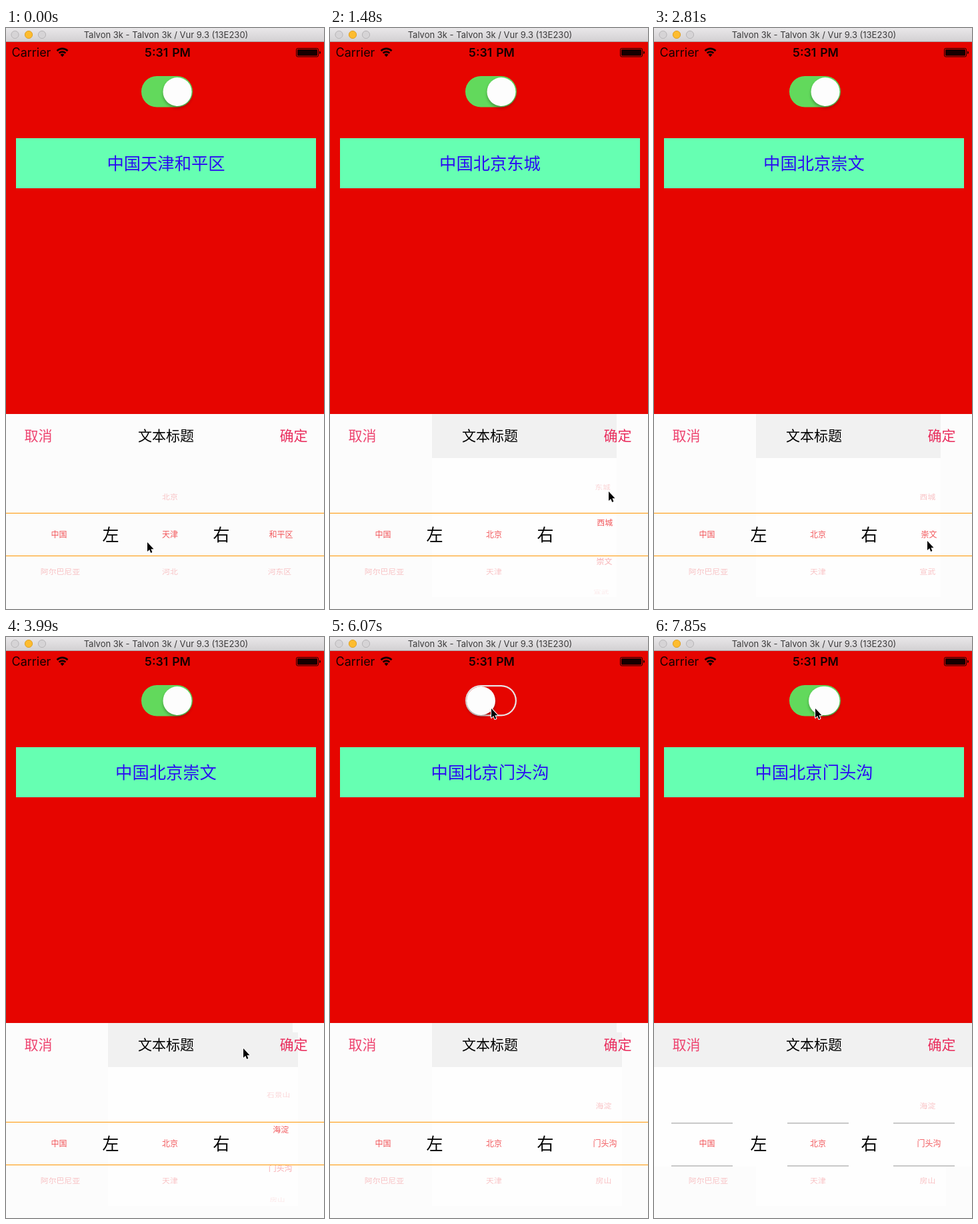
Write an HTML page that moves like this. It is 477 px wide and 870 px high and loops after 8000 ms.

```html
<!DOCTYPE html>
<html lang="zh-CN">
<head>
<meta charset="utf-8">
<title>Region picker</title>
<style>
html, body { margin: 0; width: 100%; height: 100%; overflow: hidden; background: #e60500; }
svg { display: block; width: 477px; height: 870px; }
text { font-family: "Noto Sans CJK SC", "Noto Sans CJK", sans-serif; }
.ui { font-family: Inter, sans-serif; }
.mid { text-anchor: middle; }
</style>
</head>
<body>
<svg viewBox="0 0 477 870">
  <defs>
    <linearGradient id="chrome" x2="0" y2="1">
      <stop stop-color="#e9e7e9"/><stop offset="1" stop-color="#d2d0d2"/>
    </linearGradient>
    <clipPath id="band"><rect y="727" width="477" height="63"/></clipPath>
    <clipPath id="outer"><path d="M0 644H477V726H0ZM0 791H477V852H0Z"/></clipPath>
    <filter id="soft" x="-30%" y="-30%" width="160%" height="170%"><feGaussianBlur stdDeviation="2"/></filter>
  </defs>

  <rect width="477" height="870" fill="#e60500"/>
  <rect width="477" height="21" fill="url(#chrome)"/>
  <path d="M0 20.5H477" stroke="#a9a0a2"/>
  <circle cx="13.5" cy="10" r="5.6" fill="#d6d4d6" stroke="#b7b5b7"/>
  <circle cx="34" cy="10" r="5.6" fill="#fdbc2f" stroke="#dfa023"/>
  <circle cx="54" cy="10" r="5.6" fill="#d6d4d6" stroke="#b7b5b7"/>
  <text class="ui mid" x="240" y="15" font-size="13" fill="#3b3a3b">Talvon 3k - Talvon 3k / Vur 9.3 (13E230)</text>

  <g fill="#160000">
    <text class="ui" x="8.5" y="43" font-size="18">Carrier</text>
    <text class="ui mid" x="242.5" y="43" font-size="17.7" font-weight="600" word-spacing="1.5">5:31 PM</text>
    <path d="M76.5 34.2a11.4 11.4 0 0 1 16 0M79.6 37.6a7 7 0 0 1 9.8 0" fill="none" stroke="#160000" stroke-width="2.6"/>
    <path d="M84.5 43.2l-3-3.2a4.4 4.4 0 0 1 6 0Z"/>
    <rect x="435.5" y="30.5" width="33" height="12.5" rx="2" fill="none" stroke="#160000"/>
    <rect x="437" y="32" width="30" height="9.5" rx="1"/>
    <path d="M470 34.5q2 .5 2 2.3t-2 2.3Z"/>
  </g>

  <rect id="base" x="203" y="72" width="77" height="46.5" rx="23.25"/>
  <rect id="hole" fill="#e60500"/>
  <rect id="shade" y="77" height="43" rx="21.5" opacity=".28" filter="url(#soft)"/>
  <rect id="knob" y="74" height="43" rx="21.5" fill="#fdfdfd"/>

  <rect x="15" y="165" width="450" height="75" fill="#66ffb2"/>
  <text id="label" class="mid" x="240" y="212.2" font-size="25.3" fill="#2a0cf2"></text>

  <rect y="578" width="477" height="292" fill="#fcfcfc"/>
  <path id="white" fill="#fefefe"/>
  <path id="bar" fill="#f1f1f1"/>
  <g font-size="21">
    <text x="27.5" y="617.5" fill="#ee4470">取消</text>
    <text class="mid" x="240" y="617.5">文本标题</text>
    <text x="410.5" y="617.5" fill="#e92c5c">确定</text>
  </g>

  <path id="lines" fill="none"/>
  <g id="pale" clip-path="url(#outer)" fill="#f26a70"></g>
  <g id="strong" clip-path="url(#band)" fill="#f2565a"></g>
  <text class="mid" x="157" y="768" font-size="25">左</text>
  <text class="mid" x="323" y="768" font-size="25">右</text>

  <path id="cursor" d="M0 0V14L3.2 11 5.2 16 7.4 15 5.4 10.3H9.5Z"
    stroke="#fff" stroke-width="2" paint-order="stroke" stroke-linejoin="round"/>
</svg>
<script>
const LOOP = 8000, STEP = 148.1;
const el = id => document.getElementById(id);
const set = (id, attrs) => { for (const k in attrs) el(id).setAttribute(k, attrs[k]); };

const countries = ['中国', '阿尔巴尼亚'];
const cities = ['北京', '天津', '河北', '山西'];
const tianjin = ['和平区', '河东区'];
const beijing = ['东城', '西城', '崇文', '宣武', '朝阳', '丰台', '石景山', '海淀', '门头沟', '房山'];

// Pointer stops: step, x, y
const stops = [
  [0, 212, 770], [5, 240, 806], [8, 410, 772], [10, 418, 694], [16, 410, 768],
  [19, 410, 768], [26, 425, 592], [27, 356, 616], [34, 242, 115], [37, 242, 107]
];

// Decelerating progress from step a to step b
function ease(n, a, b) {
  const f = Math.min(1, Math.max(0, (n - a) / (b - a)));
  return 1 - (1 - f) ** 2.34;
}

function pointer(n) {
  let [, x, y] = stops[0];
  for (let i = 1; i < stops.length; i++) {
    const [end, tx, ty] = stops[i], k = ease(n, stops[i - 1][0], end);
    x += (tx - x) * k;
    y += (ty - y) * k;
  }
  return `translate(${x} ${y})`;
}

const box = (x1, y1, x2, y2) => `M${x1} ${y1}H${x2}V${y2}H${x1}Z`;

// Rows sit on a cylinder of radius 106, 32 degrees apart
function wheel(items, offset, x) {
  let pale = '', strong = '';
  items.forEach((name, i) => {
    const deg = (i - offset) * 32, size = Math.abs(deg);
    if (size > 60) return;
    const rad = deg * Math.PI / 180, cos = Math.cos(rad);
    const pinch = 1 - .08 * (1 - cos);
    const place = `translate(${239 + (x - 239) * pinch} ${758.3 + 106 * Math.sin(rad)}) scale(${pinch} ${cos})`;
    const row = alpha => `<text class="mid" y="4.5" font-size="12" opacity="${alpha}" transform="${place}">${name}</text>`;
    strong += row(1);
    pale += row(.8 - size * .0122);
  });
  return [pale, strong];
}

function drawSwitch(n) {
  const on = 1 - ease(n, 38, 41) + ease(n, 50, 53);
  const press = (n > 36 && n < 40) || n > 47 ? 1 : 0;
  const hole = (1 - on) * (1 - press);
  const mix = (a, b) => Math.round(a + (b - a) * on);
  const w = 72.6 * hole, h = 42.1 * hole;
  const knob = { x: 205 + on * (30.5 - 3.5 * press), width: 43 + 3.5 * press };
  set('base', { fill: `rgb(${mix(232, 98)},${mix(228, 217)},${mix(228, 92)})` });
  set('hole', { x: 241.5 - w / 2, y: 95.25 - h / 2, width: w, height: h, rx: h / 2 });
  set('knob', knob);
  set('shade', knob);
}

function drawPanel(n) {
  const wide = n > 50;
  let white = '', bar = '';
  const tint = (x1, x2, top, bottom) => {
    bar += box(x1, top, x2, 644);
    white += box(x1, 644, x2, bottom);
  };
  if (n > 8) tint(153, 430, 578, 852);
  if (n > 25) tint(430, 438, 592, 852);
  if (wide) tint(0, 477, 578, 793);
  set('white', { d: white });
  set('bar', { d: bar });
  set('lines', wide
    ? { d: [728, 792].map(y => `M26 ${y}h92M200 ${y}h92M359 ${y}h92`).join(''), stroke: '#c9c9c9', 'stroke-width': 2 }
    : { d: 'M0 726.5H477M0 790.5H477', stroke: '#ff9500', 'stroke-width': 1 });

  const area = 2 * ease(n, 8.7, 12.3) + 6 * ease(n, 19, 32);
  const cols = [
    wheel(countries, 0, 79.5),
    wheel(cities, 1 - ease(n, 2, 6), 246),
    wheel(n < 9 ? tianjin : beijing, area, 412.5)
  ];
  el('pale').innerHTML = cols.map(c => c[0]).join('');
  el('strong').innerHTML = cols.map(c => c[1]).join('');
}

function draw(n) {
  drawSwitch(n);
  drawPanel(n);
  const region = n < 9 ? '天津和平区' : '北京' + beijing[n < 17 ? 0 : n < 32 ? 2 : 8];
  el('label').textContent = '中国' + region;
  set('cursor', { transform: pointer(n) });
}

let last = -1;
function tick() {
  const t = performance.now() % LOOP;
  const n = Math.min(53, Math.floor((t + 12) / STEP));
  if (n !== last) draw(last = n);
  requestAnimationFrame(tick);
}
tick();
</script>
</body>
</html>
```
